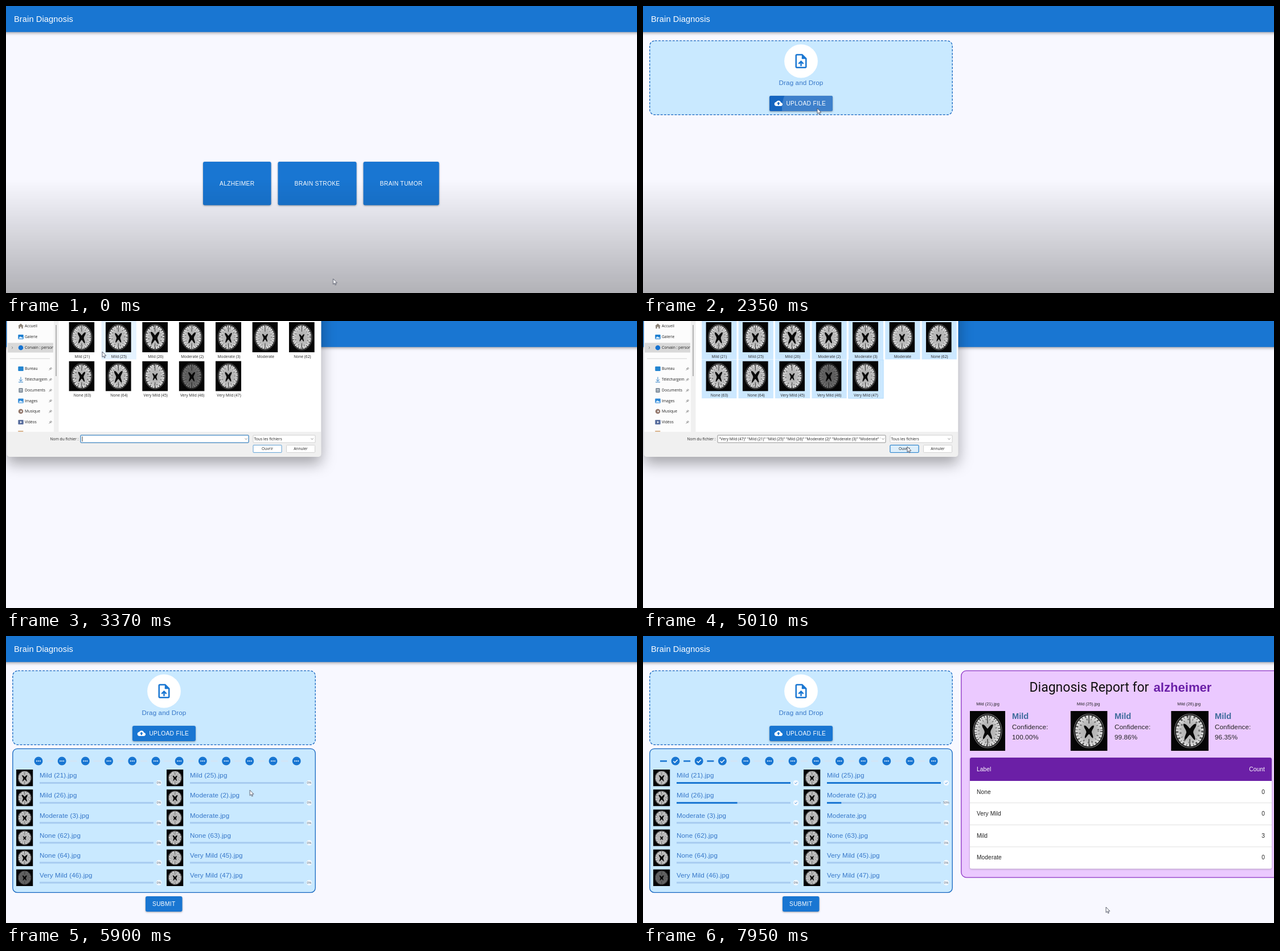
An HTML page that plays this animation: 1108 px wide and 505 px high, repeating every 8 s.

```html
<!DOCTYPE html>
<html lang="en">
<head>
<meta charset="utf-8">
<title>Brain Diagnosis</title>
<style>
html, body { margin: 0; width: 100%; height: 100%; overflow: hidden; background: #f8f8ff; }
svg { display: block; }
#stage { width: 1108px; height: 505px; font-family: "Liberation Sans", Arial, sans-serif; }
text { white-space: pre; }
.bar { filter: drop-shadow(0 2px 2.5px rgba(0,0,0,.34)); }
.btn { filter: drop-shadow(0 1.5px 1.4px rgba(0,0,0,.36)); }
.btn text { font-size: 10.25px; letter-spacing: .29px; fill: #fff; }
.body { font-size: 11.65px; letter-spacing: .11px; }
.table { font-size: 10.2px; letter-spacing: .1px; }
.paper { filter: drop-shadow(0 1.5px 1.5px rgba(0,0,0,.25)); }
#dialog { font: 6.7px "Open Sans", "Noto Sans", sans-serif; fill: #222; transform-origin: 277px 62px; animation: dialog 8s infinite; }
.window { filter: drop-shadow(0 12px 13px rgba(0,0,0,.34)); }
#cursor { animation: cursor 8s ease-in-out infinite; }
.ripple { animation: ripple 8s linear var(--at, 0s) infinite both; }
.fill { animation: fill 8s linear calc(var(--k) * 300ms) infinite both; }

@keyframes cursor {
  0%, 2.5% { transform: translate(574.5px, 480px); }
  5.6% { transform: translate(655px, 335px); }
  8.1% { transform: translate(545px, 325px); }
  11%, 18.75% { transform: translate(415px, 325px); }
  26.9%, 33.75% { transform: translate(306px, 180px); }
  40%, 42.2% { transform: translate(169px, 54px); }
  45.6%, 47.5% { transform: translate(135px, 35px); }
  53.75%, 55.6% { transform: translate(392px, 104px); }
  60.6%, 71.25% { transform: translate(464px, 221px); }
  79.4%, 81.9% { transform: translate(283px, 474px); }
  86.25%, 87% { transform: translate(423.5px, 494px); }
  97.5%, 100% { transform: translate(813px, 477px); }
}
@keyframes dialog {
  0%, 32% { opacity: 0; transform: scale(.93); }
  33.75%, 65.5% { opacity: 1; transform: none; animation-timing-function: linear; }
  66.75% { opacity: .48; transform: scale(.966); animation-timing-function: linear; }
  68%, 100% { opacity: 0; transform: scale(.93); }
}
@keyframes ripple {
  0%, 28.4% { opacity: .18; transform: scale(0); }
  29.375% { opacity: .18; transform: scale(.56); }
  32% { opacity: .18; transform: scale(1); }
  35%, 100% { opacity: 0; transform: scale(1); }
}
@keyframes fill {
  0%, 86.875% { transform: scaleX(0); }
  90.625% { transform: scaleX(.375); }
  95.625%, 100% { transform: scaleX(1); }
}
</style>
</head>
<body>
<svg id="stage" viewBox="0 0 1108 505" xmlns="http://www.w3.org/2000/svg"></svg>
<script>
const LOOP = 8000, BLUE = '#1976d2', DARK = '#1565c0', INK = '#3576c8';
const START = 6950, DONE = 7250;
const files = ['Mild (21)', 'Mild (25)', 'Mild (26)', 'Moderate (2)', 'Moderate (3)', 'Moderate',
  'None (62)', 'None (63)', 'None (64)', 'Very Mild (45)', 'Very Mild (46)', 'Very Mild (47)'];
const ventricles = [.95, .82, 1.05, .95, .85, .68, .62, .85, 1, .62, .8, .82];
const quoted = list => list.map(f => `"${f}"`).join(' ');
const each = (list, fn) => list.map(fn).join('');

const rect = (x, y, w, h, fill, more = '') =>
  `<rect x="${x}" y="${y}" width="${w}" height="${h}" fill="${fill}" ${more}/>`;
const circle = (x, y, r, fill, more = '') => `<circle cx="${x}" cy="${y}" r="${r}" fill="${fill}" ${more}/>`;
const text = (x, y, s, more = '') => `<text x="${x}" y="${y}" ${more}>${s}</text>`;
const path = (d, more = '') => `<path d="${d}" ${more}/>`;
const line = (d, color, width = 1, more = '') =>
  path(d, `fill="none" stroke="${color}" stroke-width="${width}" ${more}`);
// Visible only between two times of the loop.
const on = (from, to = LOOP) => `data-on="${from} ${to}"`;
const during = (from, to, inner) => `<g ${on(from, to)}>${inner}</g>`;
const scan = (i, x, y, w, h) => `<use href="#scan${i}" x="${x}" y="${y}" width="${w}" height="${h}"/>`;

function scanSymbol(size, i) {
  const a = 1.2 + (i * 7 % 5) * .25, b = 2 + (i * 3 % 4) * .35;
  return `<symbol id="scan${i}" viewBox="0 0 46 54" preserveAspectRatio="none">${rect(0, 0, 46, 54, '#050505')}
    <g opacity="${i === 10 ? .5 : 1}">
    <ellipse cx="23" cy="27" rx="18.6" ry="23" fill="#141414" stroke="#777" stroke-width=".8"/>
    <ellipse cx="23" cy="27" rx="17" ry="21.3" fill="url(#matter)"/>
    <g fill="none" stroke="#2a2a2a">
    <ellipse cx="23" cy="27" rx="15.5" ry="19.8" stroke-width="3" stroke-dasharray="${a} ${b} .8 3.1" opacity=".75"/>
    <ellipse cx="23" cy="27" rx="11.6" ry="15.8" stroke-width="2.4" stroke-dasharray=".9 ${b + 1.5} ${a} 4" opacity=".5"/>
    <path d="M23 6V17M23 38V48" stroke-width=".9"/></g>
    <path transform="translate(23 28) scale(${size})" fill="#080808" d="M0-4C-3-8-5-11-7.5-10C-8-6-4-3-4 1C-5 5-7 8-6 11C-3 9-2 5 0 4C2 5 3 9 6 11C7 8 5 5 4 1C4-3 8-6 7.5-10C5-11 3-8 0-4Z"/>
    </g></symbol>`;
}

const defs = `<defs>
  <radialGradient id="matter"><stop offset="0" stop-color="#aaa"/><stop offset=".6" stop-color="#bbb"/><stop offset="1" stop-color="#e2e2e2"/></radialGradient>
  <linearGradient id="shade" x2="0" y2="1"><stop offset="0" stop-opacity="0"/><stop offset="1" stop-opacity=".285"/></linearGradient>
  <clipPath id="side"><rect x="2" y="-20" width="81" height="215"/></clipPath>
  <clipPath id="entry"><rect x="132.5" y="198" width="284" height="18"/></clipPath>
  ${each(ventricles, scanSymbol)}</defs>`;

// hover: [from, to]; click: [x, y, time]
function button(id, x, y, w, h, label, { hover, click, textX = x + w / 2, icon = '' }) {
  const clip = `<clipPath id="${id}"><rect x="${x}" y="${y}" width="${w}" height="${h}" rx="3"/></clipPath>`;
  const ripple = click ? `<g clip-path="url(#${id})"><g transform="translate(${click[0]} ${click[1]})">
    ${circle(0, 0, 110, '#fff', `class="ripple" style="--at:${click[2] - 2272}ms"`)}</g></g>` : '';
  return `<g class="btn">${clip}${rect(x, y, w, h, BLUE, 'rx="3"')}
    ${rect(x, y, w, h, DARK, `rx="3" ${on(...hover)}`)}${ripple}${icon}
    ${text(textX, y + h / 2 + 3.7, label, 'text-anchor="middle"')}</g>`;
}

const header = `<g class="bar">${rect(-20, -20, 1148, 65.8, BLUE)}</g>
  ${text(14, 28, 'Brain Diagnosis', 'fill="#fff" font-size="14.6" letter-spacing=".12"')}`;

const menu = button('c1', 346, 274, 119.5, 76.5, 'ALZHEIMER', { hover: [800, 1230], click: [415, 325, 1050] })
  + button('c2', 477.5, 274, 138, 76.5, 'BRAIN STROKE', { hover: [590, 730] })
  + button('c3', 627.5, 274, 133, 76.5, 'BRAIN TUMOR', { hover: [410, 550] });

const fileIcon = 'M14 2H6c-1.1 0-1.99.9-1.99 2L4 20c0 1.1.89 2 1.99 2H18c1.1 0 2-.9 2-2V8l-6-6zm4 18H6V4h7v5h5v11zM8 15.01l1.41 1.41L11 14.84V19h2v-4.16l1.59 1.59L16 15.01 12.01 11 8 15.01z';
const cloudIcon = 'M19.35 10.04C18.67 6.59 15.64 4 12 4 9.11 4 6.6 5.64 5.35 8.04 2.34 8.36 0 10.91 0 14c0 3.31 2.69 6 6 6h13c2.76 0 5-2.24 5-5 0-2.64-2.05-4.78-4.65-4.96zM14 13v4h-4v-4H7l5-5 5 5h-3z';

const drop = rect(11.8, 61.2, 531.4, 130.2, '#c9e9ff', `rx="9" stroke="${DARK}" stroke-width="1.3" stroke-dasharray="4 2.2"`)
  + circle(277.5, 97, 29.4, '#fff')
  + path(fileIcon, `fill="${BLUE}" transform="translate(262.5 82) scale(1.25)"`)
  + text(277.5, 139, 'Drag and Drop', `class="body" fill="${INK}" text-anchor="middle"`)
  + button('c4', 222, 158, 111, 27, 'UPLOAD FILE', {
    hover: [2050, 2700], click: [306, 180, 2272], textX: 286.3,
    icon: path(cloudIcon, 'fill="#fff" transform="translate(230.7 164) scale(.6)"')
  });

function step(_, k) {
  const x = 57 + 41.2 * k;
  return `<g style="--k:${k}">${rect(x - 27, 218.8, 12, 2.6, '#d2e4f5')}${circle(x, 220, 7.5, BLUE)}
    ${during(0, DONE, each([-3, 0, 3], d => circle(x + d, 220, 1, '#fff')))}
    ${during(DONE, LOOP, rect(x - 27, 218.8, 12, 2.6, BLUE) + line(`M${x - 3.6} 220.2l2.5 2.5 4.8-4.9`, '#fff', 1.4))}</g>`;
}

function fileRow(name, k) {
  const x = 18 + 264 * (k % 2), y = 235 + 35.1 * (k >> 1), cx = x + 250.5, cy = y + 23.5;
  const label = s => text(cx, cy + 1.8, s, 'font-size="5.4" fill="#567" text-anchor="middle"');
  return `<g style="--k:${k}">${scan(k, x, y, 29.5, 29.5)}
    ${text(x + 41, y + 14.3, name + '.jpg', `class="body" fill="${INK}"`)}
    ${rect(x + 41, cy - 1.5, 200, 3, '#a7cbf0')}
    <g transform="translate(${x + 41} ${cy - 1.5})">${rect(0, 0, 200, 3, BLUE, 'class="fill"')}</g>
    ${circle(cx, cy, 4.8, '#f2f8ff')}
    ${during(0, START, label('0%'))}${during(START, DONE, label('50%'))}
    ${during(DONE, LOOP, line(`M${cx - 2} ${cy}l1.4 1.4 2.7-2.8`, BLUE, .8))}</g>`;
}

const queue = rect(11.8, 198.3, 531.4, 253, '#c9e9ff', `rx="8" stroke="${DARK}" stroke-width="1.3"`)
  + each(files, step) + each(files, fileRow)
  + button('c5', 245, 458, 64.5, 27, 'SUBMIT', { hover: [6250, 6950], click: [283, 474, 6480] });

function card(score, k) {
  const x = 574 + 176.6 * k, w = [62, 65, 66][k], tx = [648, 828, 1004][k];
  return `<g style="--k:${k}">${during(DONE, LOOP, text(x + 31.5, 122.3, files[k] + '.jpg', 'font-size="7.4" fill="#222" text-anchor="middle"')
    + scan(k, x, 132, w, 70)
    + text(tx, 146, 'Mild', 'font-size="14.6" font-weight="bold" fill="#3f6c9c"')
    + text(tx, 164, 'Confidence:', 'class="body" fill="#222"')
    + text(tx, 181.6, score, 'class="body" fill="#222"'))}</g>`;
}

function tableRow(label, i) {
  const y = 255 + 38.65 * i, base = y + 22.5, end = 'text-anchor="end"';
  const count = label === 'Mild'
    ? each([1, 2, 3], n => text(1092, base, n, `${end} ${on(DONE + 300 * (n - 1), n < 3 ? DONE + 300 * n : LOOP)}`))
    : text(1092, base, 0, end);
  return text(586, base, label) + count + (i ? rect(574, y - .5, 530, 1, '#e0e0e0') : '');
}

const report = rect(558.8, 61.2, 570, 363.6, '#ebc9ff', 'rx="9" stroke="#8a2fc4" stroke-width="1.3"')
  + text(678.5, 97.5, 'Diagnosis Report for', 'font-family="Roboto, sans-serif" font-size="23" fill="#111"')
  + text(896.5, 97.5, 'alzheimer', 'font-size="22.1" font-weight="bold" fill="#6a1fa8"')
  + each(['100.00%', '99.86%', '96.35%'], card)
  + `<g class="paper">${rect(574, 214, 530, 195.6, '#fff', 'rx="3"')}</g>`
  + path('M574 255V217q0-3 3-3H1101q3 0 3 3V255Z', 'fill="#6b1fa6"')
  + `<g class="table" fill="#222">${text(586, 237.5, 'Label', 'fill="#fff"')}
    ${text(1092, 237.5, 'Count', 'fill="#fff" text-anchor="end"')}
    ${each(['None', 'Very Mild', 'Mild', 'Moderate'], tableRow)}</g>`;

function dialogFile(name, i) {
  const col = i % 7, row = Math.floor(i / 7), x = 103.2 + 64.4 * col, y = row * 68.6;
  const cell = (fill, when, more = '') => rect(x, y - .5, 61.3, 68, fill, `${when} ${more}`);
  return (i === 1 ? cell('#e5f3ff', on(3100, 3550)) : '')
    + cell('#cce8ff', on(i ? 4400 : 3700), i === 11 ? 'stroke="#a9d6fa" stroke-width=".8"' : '')
    + scan(i, x + 7.2, y + 2, 45, 53)
    + text(x + 30.7, y + 64.5, name, 'text-anchor="middle"');
}

const places = [['Accueil', 9, '#8d8378'], ['Galerie', 28, '#1e7fd0'], ['Corvain : personnel', 47, '#1673d1'],
  ['Bureau', 84, '#2385d0'], ['Téléchargem', 103, '#2f7fc4'], ['Documents', 122, '#7d8b99'],
  ['Images', 140.5, '#2a86d6'], ['Musique', 159, '#94796d'], ['Vidéos', 178, '#5a6f9e']];

function placeIcon(i, y, c) {
  if (i === 0) return path(`M21 ${y}l5-4.5 5 4.5h-1.3v4.3h-2.5v-3h-2.4v3h-2.5v-4.3z`, `fill="${c}"`);
  if (i === 2 || i === 7) return circle(26, y, 4.3, c) + (i === 7 ? circle(26.5, y, 1.5, '#eee') : '');
  if (i === 4) return line(`M26 ${y - 4.5}v7M23 ${y}l3 3 3-3M22 ${y + 4.5}h8`, c);
  const inner = [1, 6].includes(i) ? path(`M22 ${y + 3}l3-4 2 2 1-1 2 3z`, 'fill="#dff0ff"')
    : i === 5 ? line(`M24 ${y - 1.5}h4M24 ${y + 1}h4`, '#fff', .9)
      : i === 8 ? path(`M25 ${y - 2}l3 2-3 2z`, 'fill="#fff"') : '';
  return rect(i === 5 ? 22.3 : 21.3, y - 4, i === 5 ? 7.4 : 9.4, 8, c, 'rx="1"') + inner;
}

const place = ([name, y, color], i) => placeIcon(i, y, color) + text(33, y + 2.4, name)
  + (i > 2 ? line(`M75.5 ${y + 2.6}l2-2M76.3 ${y - 1}l2.6 2.6M77.4 ${y - .6}l1.6-1.6 1.4 1.4-1.6 1.6z`, '#777', .9) : '');
const chevron = (x, y) => line(`M${x - 2} ${y - 1}l2 2 2-2`, '#666', .8);
const field = (x, y, w, stroke, more = '') => rect(x, y, w, 13, '#fff', `rx="1" stroke="${stroke}" stroke-width=".9" ${more}`);
const entry = (from, to, s) => text(133.5, 209.8, s, on(from, to));

const dialog = `<g class="window">${rect(1.5, -115, 552, 354, '#f0f0f0', 'rx="5"')}</g>
  ${rect(2, -100, 82, 295, '#fcfcfc')}${rect(92.5, -100, 460.5, 295, '#fff')}
  ${line('M88 7V97', '#8a8a8a', 1.2)}${rect(3, 38.5, 80, 17, '#d9d9d9')}
  ${line('M10 45l2 2-2 2', '#777', .8)}${line('M7 66.2H77', '#d4d4d4')}
  <g clip-path="url(#side)">${each(places, place)}${rect(21.3, 193, 9, 5, '#d9b38c')}</g>
  ${each(files, dialogFile)}
  ${text(127.5, 209.8, 'Nom du fichier :', 'text-anchor="end"')}
  ${field(131, 201, 295, '#8a8a8a')}${field(131, 201, 295, '#0f72c6', on(0, 3700))}
  <g clip-path="url(#entry)">${line('M134 203.2V212', '#111', .8, on(2700, 3700))}
    ${entry(3700, 4400, files[0])}${entry(4400, 5300, quoted([files[11], ...files.slice(0, 11)]))}
    ${during(5300, LOOP, rect(136, 202.5, 276, 10, '#1273cf') + text(415, 209.8, quoted(files.slice(4, 11)), 'fill="#fff" text-anchor="end"'))}</g>
  ${chevron(421.5, 207.5)}${field(434, 201, 109, '#ccc')}${text(435.5, 209.8, 'Tous les fichiers')}${chevron(537.5, 207.5)}
  ${field(434, 218.4, 50, '#4b93cf')}${rect(434, 218.4, 50, 13, '#dceefb', `rx="1" stroke="#0f72c6" stroke-width=".9" ${on(4800)}`)}
  ${text(459, 227.2, 'Ouvrir', 'text-anchor="middle"')}
  ${field(492.5, 218.4, 50, '#ccc')}${text(517.5, 227.2, 'Annuler', 'text-anchor="middle"')}`;

const cursor = path('M0 0V9.6L2.2 7.6 3.7 11 5.2 10.3 3.8 7.1H6.8Z', 'id="cursor" fill="#fff" stroke="#4a5060" stroke-width=".9"');

document.getElementById('stage').innerHTML = defs + rect(0, 0, 1108, 505, '#f8f8ff') + header
  + during(0, 1230, menu) + during(1230, LOOP, drop) + during(5300, LOOP, queue) + during(DONE, LOOP, report)
  + `<g id="dialog">${dialog}</g>` + rect(0, 305, 1108, 200, 'url(#shade)', on(0, 3370)) + cursor;

// One stepped keyframe rule for each distinct pair of times.
const rules = new Map();
for (const el of document.querySelectorAll('[data-on]')) {
  const key = el.dataset.on, [from, to] = key.split(' ').map(ms => ms / LOOP * 100);
  if (!rules.has(key)) rules.set(key, `@keyframes on${rules.size}{0%{opacity:0}${from}%{opacity:1}${to}%,to{opacity:0}}
    [data-on="${key}"]{animation:on${rules.size} ${LOOP}ms step-end calc(var(--k,0)*300ms) infinite both}`);
}
const sheet = document.createElement('style');
sheet.textContent = [...rules.values()].join('\n');
document.head.append(sheet);
</script>
</body>
</html>
```
